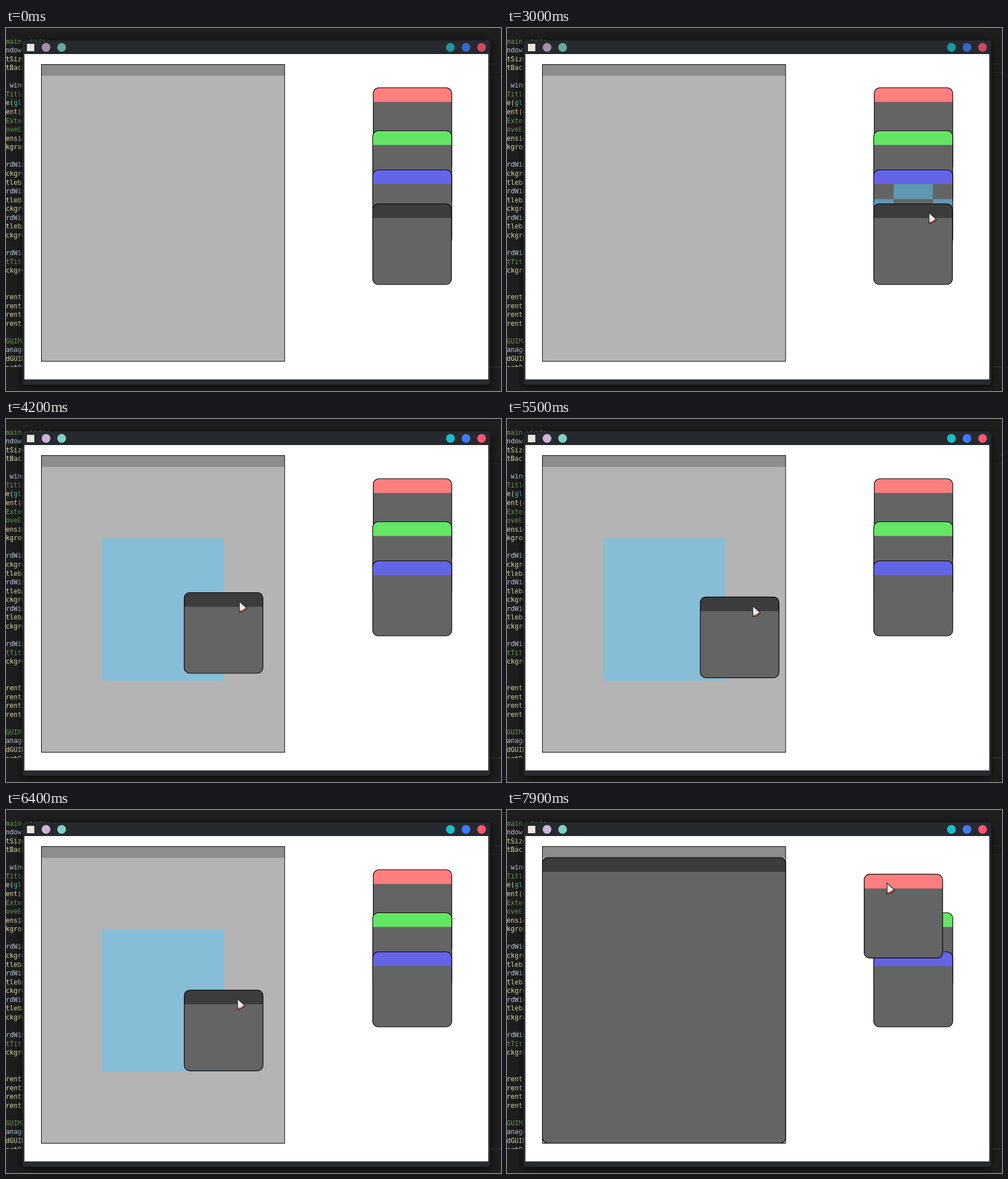
Recreate the animation shown at these times as an HTML page. Size 874 by 641 pixels, loop 8000 ms.

```html
<!DOCTYPE html>
<html lang="en">
<head>
<meta charset="utf-8">
<title>Docking windows</title>
<style>
html, body { margin: 0; width: 100%; height: 100%; overflow: hidden; background: #1e1e1e; }
svg { display: block; }
text { font: 11.67px "DejaVu Sans Mono", monospace; white-space: pre; }
#frame { filter: drop-shadow(0 3px 8px rgba(0, 0, 0, .75)); }
</style>
</head>
<body>
<svg width="874" height="641" viewBox="0 0 874 641">
  <g id="code"></g>
  <path d="M0 598H874V641H0Z" fill="#1e1e1e"/>
  <path d="M0 598.5H874" stroke="#424242"/>
  <path d="M850 63.5H874M850 78.5H874" stroke="#292929"/>
  <rect id="frame" x="29" y="22" width="826" height="608" rx="5" fill="#262a2f"/>
  <rect x="32.5" y="46" width="819" height="574.5" fill="#fff"/>
  <rect x="37" y="28" width="13" height="13" fill="#e9e6df"/>
  <g id="buttons"></g>
  <g id="scene"></g>
</svg>
<script>
const $ = id => document.getElementById(id);

// Editor lines peeking out at the left: colour key, then text
const inks = { g: '#6a9955', y: '#dcdcaa', w: '#bccbe4', t: '#4ec9b0' };
const lines = ('gmain window|wndow|ytSize|ytBack||w wind|gTitle|ye(gl|yent(g|gExten|goveEx|yensio|ykgrou||' +
  'wrdWin|yckgro|ytleba|wrdWin|ytleba|yckgro|wrdWin|ytleba|yckgro||wrdWin|gtTitl|yckgro|||' +
  'yrent|yrent|yrent|yrent||gGUIMa|wanage|ydGUIM|yartPo').split('|');
$('code').innerHTML = lines.map((s, i) => {
  const body = s.slice(1).replace(/\((.*)/, `(<tspan fill="${inks.t}">$1</tspan>`);
  return s && `<text x="-.5" y="${27.5 + i * 15.57}" fill="${inks[s[0]]}">${body}</text>`;
}).join('');

// Two buttons on the left of the title bar, three on the right, evenly spaced
$('buttons').innerHTML = ['#ceb2d8', '#80d1c8', '#1bbfca', '#3f7aff', '#ff5675'].map((color, i) =>
  `<circle cx="${i < 2 ? 70.7 + i * 27.5 : 784.7 + (i - 2) * 27.5}" cy="34.3" r="7.7" fill="${color}"/>`).join('');

// Pointer glides: start, end (in 100 ms steps), destination x, y
const glides = [
  [6, 8, 701, 118], [9, 11, 709, 119], [16, 19, 790, 290], [19, 22, 744, 325],
  [34, 42, 411, 321], [47, 49, 528, 324], [50, 52, 462, 328], [54, 57, 350, 332],
  [60, 63, 429, 333], [63, 66, 347, 331], [69, 77, 688, 120], [77, 79, 670, 128]
];
const ease = k => k * k * (3 - 2 * k);

function pointer(t) {
  let x = 810, y = 148;
  for (const [start, end, toX, toY] of glides) {
    const k = ease(Math.min(1, Math.max(0, (t - start) / (end - start))));
    x += (toX - x) * k;
    y += (toY - y) * k;
  }
  return { x, y };
}

const rect = (x, y, w, h, fill, extra = '') =>
  `<rect x="${x}" y="${y}" width="${w}" height="${h}" fill="${fill}" ${extra}/>`;

function card(x, y, w, h, color) {
  return `<g transform="translate(${x} ${y})">` + rect(0, 0, w, h, '#646464', 'rx="10"') +
    `<path d="M0 25V10Q0 0 10 0H${w - 10}Q${w} 0 ${w} 10V25Z" fill="${color}"/>` +
    rect(0, 0, w, h, 'none', 'rx="10" stroke="#000" stroke-width="1.2"') + '</g>';
}

// Drop hints: the four side zones while over the middle, otherwise the middle zone
function hints(p, x, y, w, h) {
  const u = (p.x - x) / w, v = (p.y - y) / h;
  if (u < 0 || u > 1 || v < 0 || v > 1) return '';
  const middle = Math.abs(u - .5) < .25 && Math.abs(v - .5) < .25;
  const zone = (a, b, c, d) => rect(x + a * w, y + b * h, c * w, d * h, 'rgba(90,202,254,.5)');
  return middle
    ? zone(.25, 0, .5, .25) + zone(.25, .75, .5, .25) + zone(0, .25, .25, .5) + zone(.75, .25, .25, .5)
    : zone(.25, .25, .5, .5);
}

const cursor = p => `<g transform="translate(${p.x} ${p.y})">
  <path d="M1 1L14.3 13Q9 20 1 20Z" fill="#ececec"/>
  <path d="M1 18Q8 18 12.4 12.6" fill="none" stroke="#d5503f" stroke-width="2.2"/>
  <path d="M1 1L14.3 13Q9 20 1 20Z" fill="none" stroke="#2c2c2c" stroke-width="1.4" stroke-linejoin="round"/></g>`;

function draw(t) {
  const p = pointer(t), grip = pointer(t - .1); // a dragged card trails the pointer a little
  const dragging = t >= 30 && t < 69, docked = t >= 69, redDrag = t >= 78;
  $('buttons').setAttribute('opacity', t < 31 ? .75 : 1);

  const [redX, redY] = redDrag ? [grip.x - 39.5, grip.y - 14.5] : [648.5, 105.5];
  const [darkX, darkY] = dragging ? [grip.x - 96.5, grip.y - 14.5] : [647.5, 310.5];
  const red = card(redX, redY, 138.5, 148, '#ff7f7f');

  $('scene').innerHTML = [
    rect(62.5, 64.5, 429.5, 524, '#b4b4b4'),
    rect(62.5, 64.5, 429.5, 20, '#8c8c8c'),
    dragging ? hints(p, 62.5, 84.5, 429.5, 503.5) : '',
    rect(62.5, 64.5, 429.5, 524, 'none', 'stroke="#000"'),
    redDrag ? '' : red,
    card(647.5, 181.5, 139.5, 132.5, '#64e664'),
    card(647.5, 250.5, 139.5, 132.5, '#6464e6'),
    dragging ? hints(p, 648, 275.5, 138.5, 107) : '',
    docked ? card(62.5, 84, 429.5, 504.5, '#3c3c3c') : card(darkX, darkY, 139, 142.5, '#3c3c3c'),
    redDrag ? red : '',
    t < 6 ? '' : cursor(p)
  ].join('');
}

let last = -1;
function tick() {
  const t = Math.floor(performance.now() % 8000 / 100);
  if (t !== last) draw(last = t);
  requestAnimationFrame(tick);
}
tick();
</script>
</body>
</html>
```
